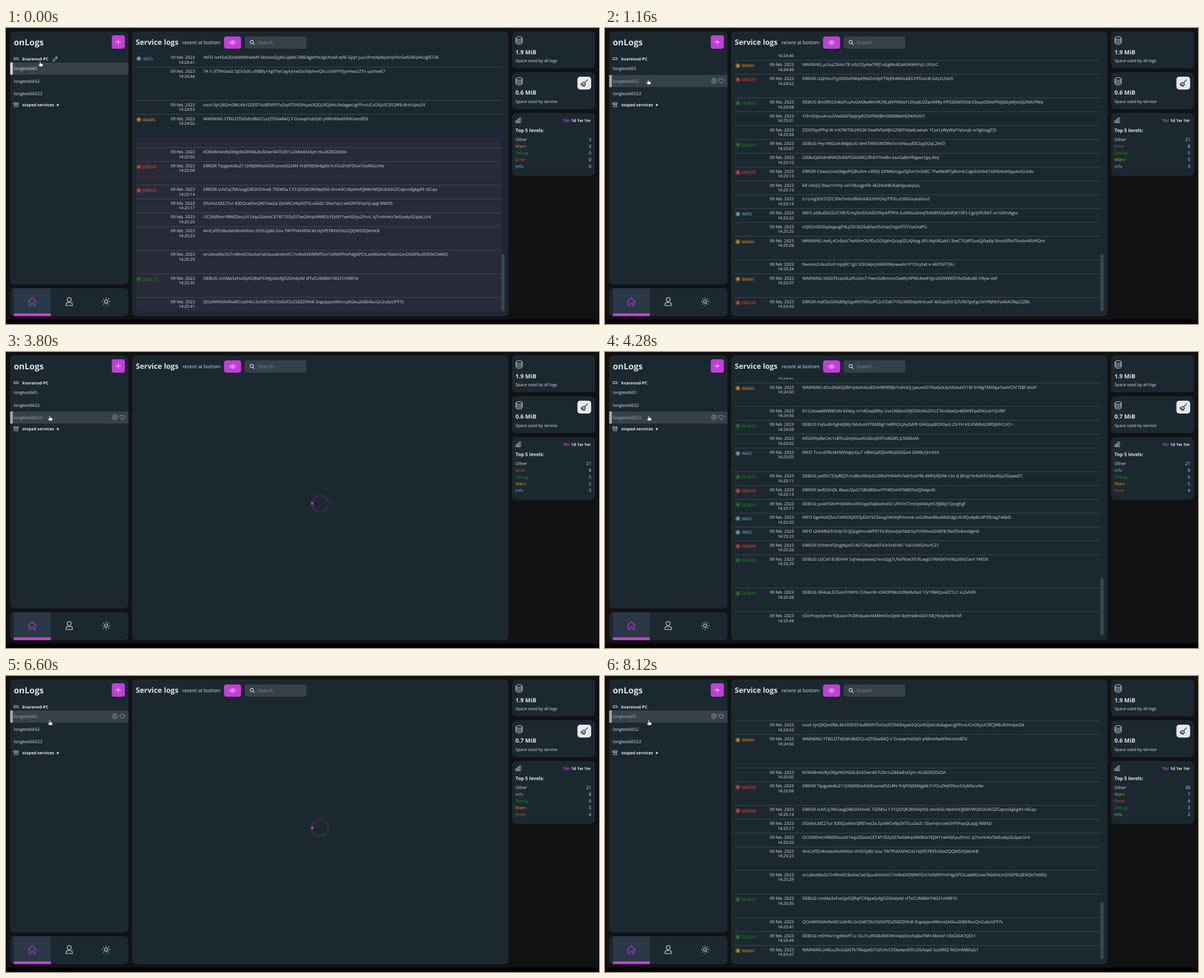
An HTML page for the animation above (9480 ms loop, 1058 px wide and 529 px high).

```html
<!DOCTYPE html>
<html lang="en">
<head>
<meta charset="utf-8">
<title>Service logs</title>
<style>
html, body { margin: 0; width: 100%; height: 100%; overflow: hidden; background: #111213; }
svg { display: block; width: 100%; height: 100%; font-family: "Open Sans", "Noto Sans", sans-serif; }
text { white-space: pre; text-rendering: geometricPrecision; }
</style>
</head>
<body>
<svg id="stage" viewBox="0 0 1058 529" preserveAspectRatio="none"></svg>
<script>
const LOOP = 9480;
const PANEL = '#1c2830', PURPLE = '#c13fd8', LIGHT = '#e0e4e6', DIM = '#a9b1b6', LINE = '#46525b';
const LEVELS = {
  INFO: ['INFO', '#7cc3dd'], WARNING: ['WARN', '#ef981c'],
  ERROR: ['ERROR', '#ee4a43'], DEBUG: ['DEBUG', '#208a22']
};
const STAT_COLORS = { Other: LIGHT, Warn: '#ef981c', Debug: '#208a22', Error: '#ee4a43', Info: '#7cc3dd' };

const logsA = `24:41 INFO ivsYEaQShddNWHwM9 eb9xwQyjKtLajbKCilME4gJeYht3gUhoM ejR6 GjqY juuUPmtXp8q3mjHXnGzN3KQvKUgfE736
24:44 7A Y zf7Mnlad2 SJChSd6 ufXB8y1Agf7teCvgAJrtwDo3dphveQfuUGNYYifjycHwcSZTn uptYwiE7
24:53 nxz4 IIjrQ8Qm0ML4bYZGF0T4uBf09YlTvOq4TONl3Hyak5QQLRGjhbUbdagwUgFPIrxUCvOSyUCSfCJWEc8rHUpstZ4
24:56 WARNING YTBiLf2TbDdlc8M2CLvQT0Sw84Q V DcwqeYobfpD yNRnA9aAYRAUomBTd
25:05 KOKkBm4xRyORJp9kDNS6L8x5Owr4A7UDt1u2kEwEskSjm Hu263SD0zDA
25:08 ERROR Ttpgp4o8uZ11JIINJ00KeAiGlEssnxd5ZzRN YHjPi9JSM4g6lk7cYOuZHjPD6vr53yMGcvHe
25:14 ERROR sUVCq7MUazgDiB2XZHneE 7SEMSu f X1QOQK3RVNq956 tlnnk5CnfpeVnFJJMKrWQ0Uk36GZCqbosEgkg49 r6Cqa
25:17 DGs9xLMZ27ur 830QzakhoQREYwz2a Zp6WCeNyDtT5LuGkZc SSwYvjs1zeIGhP5htpQLapJJ NMXD
25:20 OCStM5mrVRMZEeuUV1Aip2GioIoCET4F1DZy5STwGMrpi9W8OcYEj0tY1wHGFyuZYnrL zj7nsHnKxTetEzakyGLlpaLUr4
25:23 4mCzFfZnRodasWvXA9Gn tFi5S3yBX Gox TW7Pi4XXPAC4s16JVfSTRVhI5itsZQQW50QWnKB
25:29 orUdooMa3U7r4Rm0CibxSw7ab5Juu6HAnVCi7mRx6VDMWTEzt7z0MiPFmPdgGPCtLaeMGmw7kbtkhLInDS0if9v2E9QkCN4RQ
25:35 DEBUG UmMa3xFsxQpSQRqPCiNJyaGcfgO2Ghdy4d sfTxCUMB6h74G31rKR81b
25:41 QOxWKNVA49xMCUa94Cc3cDdIC9SrS5iGVfZvZS8ZZNhi8 DqpqzpoAMoncJAGku2k8E4lucQn2ubzUPF7s
25:44 DEBUG m0YNo1ngMHzff Lc Ou7cul950kBM7tKH4pijOcvSqBa7WH 8bIvoF ObG36A7QOi1
25:47 WARNING jHRLu3fx2oSN7k7fi6qpkD7s2fcArC55keApd5fCc05Aop6 5cs8REZ R6SmMBFqG1`.split('\n');

const logsB = `24:46 Rk2vTq8Lw0ZsN4 hYc7UeBd1xPo9GmJfA3iKrQW5tSzXn
24:49 WARNING pL6uZ3kHcT8 sVb2QyNw7RfJ1oEgMx4DaKi9tWzPq5 UhSrC
24:52 ERROR LGJh9ccl7yjXID0sFkBq499d2m3pFT9tJFkiMI6ukEGY9TozLI8 GAJ2LSdr0
24:58 DEBUG 8m0R5C64kbFcuFvGA58wWmfK39LjdVPKMa7c2KqdLOZarl49Ry FfF5Z6WIO0dr33sqaO0XePNIJJGEyMjVzGJ2NKrPWa
25:01 YI3n3SIJouAnsu5VaG66TqeJrjyR25ATMdBm0G8WekHJ2NA5A01
25:04 ZZ0OfqnPPql W mX7W7Sh2K53K 0wsRVSeNJhS2987Vda4Liwkah 1Css1yWyWpFYalxnj6 roYg6cqgTJ5
25:07 DEBUG Pey1W02sK4Mg6UG dmkTW5tSMZWoTv16NsuyEIE2zg0QqL2ihlO
25:10 t268oQdDdnWWI2lnE6PGXi2MCLRhEYIYosBn kaxGaBnY8igws1gq dIoJ
25:13 ERROR CXwvsUveDNgoPQBIufIm v3fKQ DXNWzUguiSjOm7n3zBC 7FwWeWTyBcmILCqJe3cb9s67eEVlz6xN5py4oGx2dn
25:16 6R ribSJQ l0ao1HVYp oH7dbicgJnFb 4EiZKsK8U6alHjpu6q5zL
25:19 iL1Lmg5DrS7JTC39e7mhUB66rKN32HYOXpTfF5LzOXDGsykaExo2
25:22 INFO a5BuEkG5UCYIR7CmySmDUAEDYfqxkP5PiX 6uM0vuSmqTbXt8X5UpN3FJK10F5 CgvlylfUK6T xn1GfmAgjvi
25:25 oQllOnXD2bybqpvgP4LjOl5362SqEAysI5cHqChqjs0TCFciaOIaPG
25:28 WARNING AvKj eOrBulcTwARmOUfDuSOSqhrQczq0ZLKJIbzg dPLNq6RGzkO 3lwC7GdPZuoQj0q4lp Bnot5fRoT9u4o445HlQtn
25:34 Nwmm2rAiuOo9 mJsjRC1gX 20K34prjXdAR3Mjvww0s1P1DcySet e 46lYGF73lU
25:37 WARNING I6XGiTEcqc0LpPLsXm7 Fwm5z8mnznOwWy9PWs4eeKYgcsXDVW85l7AvZkduBE H9yw xbF
25:43 ERROR mdf2bGNVjBRgGgvlfhI7HSxzPC2cFZd67YToI3Nf0dpNmLwIf 4k5xpIJYd Sj7cfN7gsFgcOrlYRJh6Yiyil4AO8q22ZBL
25:46 ERROR bnDIHkyZVxtZQjNdBAD6XtOd6ZDmDKYgF7 yGT0ZETW1DKE7Hk0u QmLr`.split('\n');

const logsC = `24:47 Vt5oJq2XgL8 nRc0WbYk7ZsHe4UiMd9Ta
24:50 WARNING dOuD6dOj38Fnj4oXieScBZnHW9fWJk1tdHd2j JyeueVD7NaQck3p59xbaVS1W 5rNlgTMXNja7aIxVChf fZ8f sKoP
24:56 D1Cskowe8XW8Yxfs 6V4cp m1dGxqtBWy UorLNEbix39jf2SKnNvZFcLCTArit0wQvM5KNTqxENGxb1QcfRF
24:59 DEBUG FqGu8n5gNdJMy1MvlzoXVTbMBgf hARhOLJAyGAf8 GFAGzp8OXUpG 2SrYH kILVNMoXLW0tjhfrCoO r
25:02 kfGOFltpBeCAc1vBTco2mJHuuKU6EcIJA9Tvs8GRS JLN0MnfA
25:05 INFO 7cucxFlRLM4N9VqkjcGu7 xBNGipfQbxWoZ6IDZa4 GWRLFjtrrk54
25:11 DEBUG jad5lcT53y8EJTUnzBtnXbhpZcz0RoPh94eFLNah5xkPRL4MPpRjDM n2z sJ J8Ug19rN2k5V3auKGy2GxpwZl1
25:14 ERROR IavR33nDL BwuUZpG158GB0kxvYf1WCklrEFN8D9uQJSwpc6t
25:17 DEBUG px4tYGfePHfJAWxrOFOqyd56J6w6nED UFhTn77mFjzkNAyh57JJ88jJ1QzzgKgf
25:20 INFO 6geVislQ5zv7zW50QK9TpE0iYSCEeog2iKHnJfHxmxb xzCsWaxRbuiMdZdgUXUfQx4pBs3P39Uag746bD
25:23 INFO GldtMbk3rDdJriTr3j2pgHnroWP01Fb30oxxJxJrfddc5yI7iXWxxoDd0F8 lllaOSt4isn0gm0
25:26 ERROR D0YdmFQngJNjvt51A072RqheM743r0cKH45 1oEONXl2HxYCZ1
25:29 DEBUG LGCdi1B 8EH4Y 5qhlwqwieaq1kvoGJg7LNsPXoe3Tc9LwgG1WA0XPxVKp26hClavV YMO6
25:38 DEBUG 3K4saLSCGaUFzN9Yc CiXwmB n34OlP8KclU8lpRu9aX 1G19BAQuxEZ1LC xLZxhF8
25:44 s5XrPcqvXjmm fOJuxzv7hZW3pakvfAM8mOoQJeIlI ByfmkBnG69 NEJYkXyMo9rrEF`.split('\n');

const stats = [
  'Other 3 Warn 3 Debug 0 Error 0 Info 0',
  'Other 21 Error 8 Debug 5 Warn 5 Info 3',
  'Other 21 Info 8 Debug 6 Warn 5 Error 4',
  'Other 28 Warn 7 Error 4 Debug 3 Info 2'
];

// start, pointer x, pointer y, hovered row (-2 header, -1 none)
const pointer = [
  [0, 61, 60, -2], [40, 64, 64, 0], [80, 67, 68, 0], [120, 70, 71, 0], [160, 72, 73, 0], [200, 73, 74, 0],
  [440, 75, 83, 1], [520, 77, 92, 1], [2520, 78, 92.5, 1], [2920, 78, 105, 2], [3000, 78, 114, 2],
  [5760, 78, 107, 2], [6040, 78, 99, 1], [6080, 78, 88, 1], [6160, 78, 79, 0],
  [7800, 78, 80, -1], [8120, 78, 79, 0]
];
// start, view, statistics set, selected row
const views = [
  [0, 'a0', 0, 0], [1120, 'wait', 0, 1], [1160, 'b0', 1, 1], [2520, 'b1', 1, 1],
  [3800, 'wait', 1, 2], [4280, 'c', 2, 2], [6560, 'wait', 2, 0], [6960, 'a1', 3, 0]
];

const box = (x, y, x2, y2, r, fill) =>
  `<rect x="${x}" y="${y}" width="${x2 - x}" height="${y2 - y}" rx="${r}" fill="${fill}"/>`;
const txt = (x, mid, s, size, fill = LIGHT, more = '') =>
  `<text x="${x}" y="${(mid + size * .36).toFixed(2)}" font-size="${size}" fill="${fill}" ${more}>${s}</text>`;
const bold = (x, mid, s, size, fill, more = '') => txt(x, mid, s, size, fill, 'font-weight="700" ' + more);
const icon = (d, x, y, color = LIGHT, w = 1) =>
  `<path d="${d}" transform="translate(${x} ${y})" fill="none" stroke="${color}" stroke-width="${w}" stroke-linecap="round" stroke-linejoin="round"/>`;
const END = 'text-anchor="end"';

const BOTTOM = 506.2;
const seconds = s => s.slice(0, 2) * 60 + +s.slice(3, 5);
const rowHeight = gap => 24.75 + 17.4 * (gap / 3 - 1);

// Rows stack upward from the bottom; a longer gap in time leaves empty lines.
function logList(lines, lastGap = 3) {
  let top = BOTTOM, next = seconds(lines[lines.length - 1]) + lastGap, out = '';
  for (const line of [...lines].reverse()) {
    const time = line.slice(0, 5), msg = line.slice(6);
    top -= rowHeight(next - seconds(time));
    next = seconds(time);
    out += `<path d="M232 ${top.toFixed(2)}H884" stroke="${LINE}" stroke-width=".8"/>`
      + txt(337, top + 7.5, '09 feb. 2023', 7.5, LIGHT, END)
      + txt(337, top + 16.1, '14:' + time, 7.35, LIGHT, END)
      + txt(352, top + 7.5, msg, 7.55, '#d9dde0');
    const level = LEVELS[msg.split(' ')[0]];
    if (level) {
      const y = top + 9.5;
      out += `<circle cx="237" cy="${y}" r="3.7" fill="none" stroke="${level[1]}" stroke-width=".8"/>`
        + `<circle cx="237" cy="${y}" r="2.2" fill="${level[1]}"/>` + txt(244, y + .2, level[0], 7.7, level[1]);
    }
  }
  return out;
}

const logGroup = (id, rows, glowTop) => `<g id="${id}">`
  + (glowTop ? `<rect id="${id}-glow" x="232" y="${glowTop}" width="652" height="${BOTTOM - glowTop}" rx="4" fill="#282a39"/>` : '')
  + rows + box(884, 404, 889.5, 506, 2, '#3c4952') + '</g>';

const db = 'M0 2.5C0 -.8 11 -.8 11 2.5S0 5.8 0 2.5V11C0 14.3 11 14.3 11 11V2.5M0 5.5C0 8.6 11 8.6 11 5.5M0 8.4C0 11.5 11 11.5 11 8.4';
const gear = 'M-1 -4.5H1L1.6 -3.2 3.1 -3.7 4.1 -2.1 3.5 -.8 4.5 0 3.5 1 4 2.4 2.8 3.6 1.5 3.3 .8 4.5H-.9L-1.5 3.3 -2.9 3.6 -4 2.3 -3.4 1 -4.5 0 -3.5 -1 -4 -2.4 -2.8 -3.6 -1.5 -3.2ZM1.6 0A1.6 1.6 0 1 1 -1.6 0A1.6 1.6 0 1 1 1.6 0';
const heart = 'M0 4C-3 1.8 -4.3 .4 -4.3 -1.4C-4.3 -4 -1.2 -4.4 0 -2.1C1.2 -4.4 4.3 -4 4.3 -1.4C4.3 .4 3 1.8 0 4Z';
const eye = 'M-5.3 0C-3 -4.4 3 -4.4 5.3 0C3 4.4 -3 4.4 -5.3 0ZM1.7 0A1.7 1.7 0 1 1 -1.7 0A1.7 1.7 0 1 1 1.7 0';
const home = 'M-7 0L0 -7 7 0M-5.6 -1.2V7H-2V2.2H2V7H5.6V-1.2';
const person = 'M3.5 -3.6A3.5 3.6 0 1 1 -3.5 -3.6A3.5 3.6 0 1 1 3.5 -3.6M-5.6 7V4.6Q-5.6 1.8 -2.8 1.8H2.8Q5.6 1.8 5.6 4.6V7Z';
const sun = 'M3 0A3 3 0 1 1 -3 0A3 3 0 1 1 3 0' + [...Array(8)].map((_, i) => {
  const c = Math.cos(i * Math.PI / 4), s = Math.sin(i * Math.PI / 4);
  return `M${(c * 5.8).toFixed(2)} ${(s * 5.8).toFixed(2)}L${(c * 7).toFixed(2)} ${(s * 7).toFixed(2)}`;
}).join('');

const rowMid = [72.5, 94.8, 117.1];
const names = ['longtest665', 'longtest6652', 'longtest66523'];

const sidebar = box(7.5, 6, 218.5, 458.5, 8, PANEL)
  + bold(14, 25.5, 'onLogs', 15.1, LIGHT)
  + box(188.7, 13, 212, 37, 4, PURPLE) + icon('M-4.8 0H4.8M0 -4.8V4.8', 200.4, 25, '#f3e6f6')
  + '<g id="pick">' + box(7.5, -10.8, 218.5, 10.8, 0, '#364149') + '<rect id="bar" x="7.5" y="-10.8" width="4.7" height="21.6"/></g>'
  + icon('M0 0H7V3.4H0Z', 14.8, 53.1, LIGHT, .9) + bold(29, 55, 'kvarenod-PC', 7.4, LIGHT)
  + `<g id="pencil">${icon('M-4 4L-3.4 1.6 2 -3.8 3.9 -1.9 -1.6 3.4ZM.8 -2.6L2.7 -.7', 88, 54.8, LIGHT, .9)}</g>`
  + names.map((n, i) => txt(14, rowMid[i], n, 7.65, LIGHT, `id="name${i}"`)).join('')
  + `<g id="tools">${icon(gear, 194.3, 0, '#aab2b7', .8)}${icon(heart, 207.5, 0, '#aab2b7', .9)}</g>`
  + icon('M0 0H7.6V2.2H0ZM.7 2.2V7H6.9V2.2M2.8 4H4.8', 14.2, 133.7, LIGHT, .8)
  + bold(29, 137.2, 'stoped services', 7.4, LIGHT) + `<path d="M91 135.3L95 137.6 91 139.9Z" fill="${LIGHT}"/>`;

const nav = box(7.5, 465, 218.5, 515, 8, PANEL) + box(14, 465, 80, 515, 0, '#2a3746') + box(14, 510, 80, 515, 0, PURPLE)
  + icon(home, 46.7, 489, PURPLE, 1.1) + icon(person, 112.8, 489, LIGHT, 1.1) + icon(sun, 178.8, 489, LIGHT, 1.1);

const main = box(225, 6, 896.5, 515, 8, PANEL)
  + bold(231.5, 25.5, 'Service logs', 13.1, LIGHT) + txt(315, 26, 'recent at bottom', 8.65, LIGHT)
  + box(389, 15, 419.5, 37, 4.5, PURPLE) + icon(eye, 404.3, 26, '#f7ecf9', .9)
  + box(426, 15, 536, 37, 4, '#354049') + icon('M2.2 -.8A2.9 2.9 0 1 1 -3.6 -.8A2.9 2.9 0 1 1 2.2 -.8M1.4 1.3L4 4', 439, 25.8, LIGHT, 1.2)
  + txt(449, 26, 'Search', 9, '#7d888f')
  + '<clipPath id="view"><rect x="226" y="45.8" width="669" height="461"/></clipPath><g clip-path="url(#view)">'
  + logGroup('a0', logList(logsA.slice(0, -2)), 196.3) + logGroup('a1', logList(logsA))
  + logGroup('b0', logList(logsB.slice(0, -1))) + logGroup('b1', logList(logsB), 481.45)
  + logGroup('c', logList(logsC, 6)) + '</g>'
  + '<g id="wait"><circle cx="560.5" cy="271" r="14.5" fill="none" stroke="#2d2e40" stroke-width="4"/>'
  + `<circle id="dot" r="2.4" fill="#b73fd0"/><g id="down">${box(863, 481.5, 885, 503.5, 4, '#5a2d70')}`
  + icon('M0 -4V4M-3.4 .7L0 4 3.4 .7', 874, 492.3, '#8b7298', .9) + '</g></g>';

const cards = box(903, 6, 1051, 72, 8, PANEL) + box(903, 79, 1051, 145, 8, PANEL) + box(903, 152, 1051, 264, 8, PANEL)
  + icon(db, 910, 15.5) + bold(909, 43, '1.9 MiB', 10.3, LIGHT) + txt(909, 58.5, 'Space used by all logs', 7.4)
  + icon(db, 910, 88.5) + bold(909, 115.5, '', 10.3, LIGHT, 'id="size"') + txt(909, 131.3, 'Space used by service', 7.4)
  + box(1019.5, 87, 1044, 110, 5, '#e6e8e9')
  + icon('M6 -6L1.3 -.8M-1 -1.8L2.4 1.3M-1 -1.8C-2.2 -.2 -3.6 .4 -5.6 .8C-4.8 3.4 -2.8 5 .4 5.6C1.3 4.2 2 3 2.4 1.3M-3.6 2.6L-2 1.5M-1.3 4.5L0 2.8', 1031.5, 98.7, '#1b2024', 1.2)
  + icon('M0 5H2.3V8.4H0ZM2.9 2.6H5.2V8.4H2.9ZM5.8 0H8.1V8.4H5.8Z', 910, 160.8, LIGHT, .8)
  + bold(1043, 165.7, `<tspan fill="${PURPLE}">1hr</tspan> 1d 1w 1m`, 7.4, LIGHT, END)
  + bold(909, 183, 'Top 5 levels:', 8.6, LIGHT) + '<g id="stats"></g>';

const hand = '<path id="hand" d="M-1 .3Q0 -.7 .9 .3V3.2L4 3.8Q5.2 4.1 5.1 5.3L4.4 9H-.8L-3.6 5.6Q-3.6 4.4 -2.4 4.7L-1 5.7Z" fill="#fff" stroke="#20262a" stroke-width=".7"/>';

const stage = document.getElementById('stage');
stage.innerHTML = box(0, 0, 1058, 529, 0, '#111213') + box(0, 521, 1058, 529, 0, '#000')
  + box(0, 0, 1, 529, 0, '#000') + box(1057, 0, 1058, 529, 0, '#000') + sidebar + nav + main + cards + hand;

const el = id => document.getElementById(id);
const set = (id, key, value) => el(id).setAttribute(key, value);
const show = (id, on) => set(id, 'display', on ? 'inline' : 'none');
const at = (list, t) => list.filter(k => k[0] <= t).pop();

function statRows(line) {
  const words = line.split(' ');
  let out = '';
  for (let i = 0; i < 5; i++) {
    const mid = 199 + i * 12.1, name = words[2 * i];
    out += txt(909, mid, name, 7.6, STAT_COLORS[name]) + txt(1044, mid, words[2 * i + 1], 7.6, LIGHT, END);
  }
  return out;
}

let shownStats = -1;

function draw(t) {
  const [start, view, statSet, picked] = at(views, t);
  const [, x, y, hover] = at(pointer, t);

  for (const id of ['a0', 'a1', 'b0', 'b1', 'c', 'wait']) show(id, id === view);
  set('a0-glow', 'opacity', Math.max(0, 1 - Math.floor(t / 40) / 5));
  set('b1-glow', 'opacity', t < 2640 ? 1 : 0);

  const first = start === 1120;
  show('down', first);
  set('dot', 'cx', first ? 547 : 546.3);
  set('dot', 'cy', first ? 267 : 271);

  if (statSet !== shownStats) {
    shownStats = statSet;
    el('stats').innerHTML = statRows(stats[statSet]);
    el('size').textContent = statSet === 2 ? '0.7 MiB' : '0.6 MiB';
  }

  set('pick', 'transform', `translate(0 ${rowMid[picked]})`);
  set('bar', 'fill', hover === picked ? '#a3abb0' : '#d0d5d8');
  names.forEach((_, i) => set('name' + i, 'fill', i === hover ? DIM : LIGHT));
  show('pencil', hover === -2);
  show('tools', hover >= 0);
  if (hover >= 0) set('tools', 'transform', `translate(0 ${rowMid[hover] - .3})`);
  set('hand', 'transform', `translate(${x} ${y})`);
}

const origin = performance.now();
function tick() {
  draw((performance.now() - origin) % LOOP);
  requestAnimationFrame(tick);
}
tick();
</script>
</body>
</html>
```
